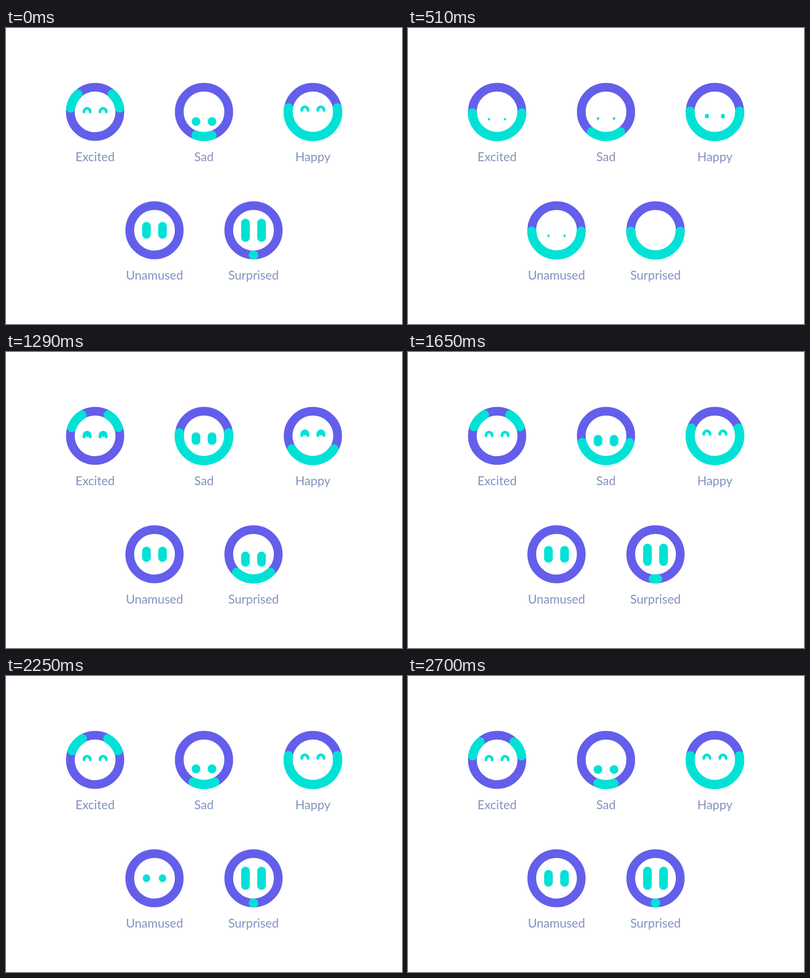
An HTML page with a canvas that plays this animation: 800 px wide and 600 px high, repeating every 2730 ms.

```html
<!DOCTYPE html>
<html lang="en">
<head>
<meta charset="utf-8">
<title>Moods</title>
<style>
  html, body { margin: 0; width: 100%; height: 100%; overflow: hidden; background: #fff; }
  canvas { display: block; }
</style>
</head>
<body>
<canvas id="stage" width="800" height="600"></canvas>
<script>
const LOOP = 2730, STEP = 30, REST = 800, OPEN = 940;
const RING = '#635fea', TEAL = '#00e2d6', LABEL = '#8392be';
const EYE = 17.5, EYE_DX = 16.2, SMILE = 88;
const ctx = document.getElementById('stage').getContext('2d');

const mix = (a, b, u) => a + (b - a) * u;
const ramp = (t, start, end) => Math.min(1, Math.max(0, (t - start) / (end - start)));
const smooth = (t, start, end) => {
  const u = ramp(t, start, end);
  return u * u * (3 - 2 * u);
};
const easeOut = (t, start, end) => 1 - (1 - ramp(t, start, end)) ** 2;
const spring = (t, start, halfPeriod) => {
  const u = Math.max(0, t - start) / halfPeriod;
  return 1 - Math.exp(-1.55 * u) * Math.cos(Math.PI * u);
};

// Every face collapses into a common smile, opens into its enter pose and settles into its ready pose.
// from, to: mouth angles away from the bottom of the ring; a negative "to" hides the mouth.
// leave, arrive: when the mouth moves to and from the smile. shut, grow: end of eye closing, time to reopen.
const faces = [
  { name: 'Excited', x: 180, y: 170, arch: true,
    enter: { from: 112, to: 149, eyeY: -1.3, eyeH: EYE },
    ready: { from: 99, to: 136, eyeY: -1, eyeH: EYE },
    settle: t => smooth(t, 2250, 2760),
    leave: [0, 500], arrive: [945, 1320], shut: 588, grow: 220, closedY: 20 },
  { name: 'Sad', x: 400, y: 170,
    enter: { from: 0, to: 100, eyeY: 5, eyeH: 26 },
    ready: { from: 0, to: 18.8, eyeY: 19.5, eyeH: EYE },
    settle: t => smooth(t, 1140, 2500),
    leave: [380, 780], arrive: [945, 1150], shut: 594, grow: 160, closedY: 11 },
  { name: 'Happy', x: 620, y: 170, arch: true,
    enter: { from: 0, to: 58, eyeY: -4, eyeH: EYE },
    ready: { from: 0, to: 99.5, eyeY: -4, eyeH: EYE },
    settle: t => spring(t, 1290, 360),
    leave: [60, 800], arrive: [945, 1290], shut: 622, grow: 220, closedY: 19 },
  { name: 'Unamused', x: 300, y: 410, blink: 2165,
    enter: { from: 0, to: -10, eyeY: 0, eyeH: 31 },
    ready: { from: 0, to: -10, eyeY: 0, eyeH: 34 },
    settle: t => smooth(t, 1250, 1550),
    leave: [150, 500], arrive: [945, 1085], shut: 588, grow: 280, closedY: 15 },
  { name: 'Surprised', x: 500, y: 410,
    enter: { from: 0, to: SMILE, eyeY: 20, eyeH: 13 },
    ready: { from: 0, to: 0, eyeY: 0, eyeH: 47 },
    settle: t => easeOut(t, 1057, 1833),
    leave: [50, 500], arrive: [945, 1057], shut: 505, grow: 280, closedY: 13 },
];

function poseAt(face, t) {
  const closing = t < REST;
  const settled = closing ? 1 : face.settle(t);
  const calm = closing ? smooth(t, ...face.leave) : 1 - smooth(t, ...face.arrive);
  const size = closing ? 1 - smooth(t, face.shut - 240, face.shut) : smooth(t, OPEN, OPEN + face.grow);
  const value = key => mix(face.enter[key], face.ready[key], settled);
  return {
    from: mix(value('from'), 0, calm),
    to: mix(value('to'), SMILE, calm),
    eyeY: mix(face.closedY, value('eyeY'), size),
    eyeH: value('eyeH'),
    size,
    arch: !face.arch ? 0 : closing ? 1 - smooth(t, 260, 410) : smooth(t, 1240, 1460),
    blink: face.blink ? .8 * Math.sin(Math.PI * ramp(t, face.blink, face.blink + 280)) ** 2 : 0,
  };
}

function strokeArc(face, from, to, color, width) {
  const rad = deg => (90 + deg) * Math.PI / 180;
  ctx.strokeStyle = color;
  ctx.lineWidth = width;
  ctx.beginPath();
  ctx.arc(face.x, face.y, 50, rad(from), rad(to));
  ctx.stroke();
}

function drawMouth(face, { from, to }) {
  const width = 18.7 * ramp(to, -10, 0);
  if (width < .1) return;
  const end = Math.max(to, .1);
  strokeArc(face, from, end, TEAL, width);
  strokeArc(face, -end, -from, TEAL, width);
}

// A round eye whose underside is hollowed out as bend goes from 0 to 1.
function archPath(bend) {
  const leg = 1 + 3 * (1 - bend), top = leg - 5.9 * bend, r = 2.7;
  ctx.arc(0, 0, 9, Math.PI, 0);
  ctx.lineTo(9, leg);
  ctx.arc(9 - r, leg, r, 0, Math.PI);
  ctx.bezierCurveTo(2.8, top, -2.8, top, 2 * r - 9, leg);
  ctx.arc(r - 9, leg, r, 0, Math.PI);
  ctx.closePath();
}

function drawEyes(face, { eyeY, eyeH, size, arch, blink }) {
  if (size < .01) return;
  const w = EYE * size * (1 - .3 * blink);
  const h = EYE * size * mix(1.2, eyeH / EYE, size * size) * (1 - blink);
  ctx.fillStyle = TEAL;
  for (const side of [-1, 1]) {
    ctx.save();
    ctx.translate(face.x + side * EYE_DX, face.y + eyeY);
    ctx.beginPath();
    if (arch > .02) {
      ctx.scale(size, size);
      archPath(arch);
    } else {
      ctx.roundRect(-w / 2, -h / 2, w, h, Math.min(w, h) / 2);
    }
    ctx.fill();
    ctx.restore();
  }
}

function draw(t) {
  ctx.fillStyle = '#fff';
  ctx.fillRect(0, 0, 800, 600);
  ctx.lineCap = 'round';
  ctx.textAlign = 'center';
  ctx.font = '24.7px Lato, sans-serif';
  for (const face of faces) {
    const pose = poseAt(face, t);
    strokeArc(face, 0, 360, RING, 17.6);
    drawMouth(face, pose);
    drawEyes(face, pose);
    ctx.fillStyle = LABEL;
    ctx.fillText(face.name, face.x, face.y + 100);
  }
}

function tick() {
  draw(Math.floor(performance.now() % LOOP / STEP) * STEP);
  requestAnimationFrame(tick);
}
tick();
</script>
</body>
</html>
```
